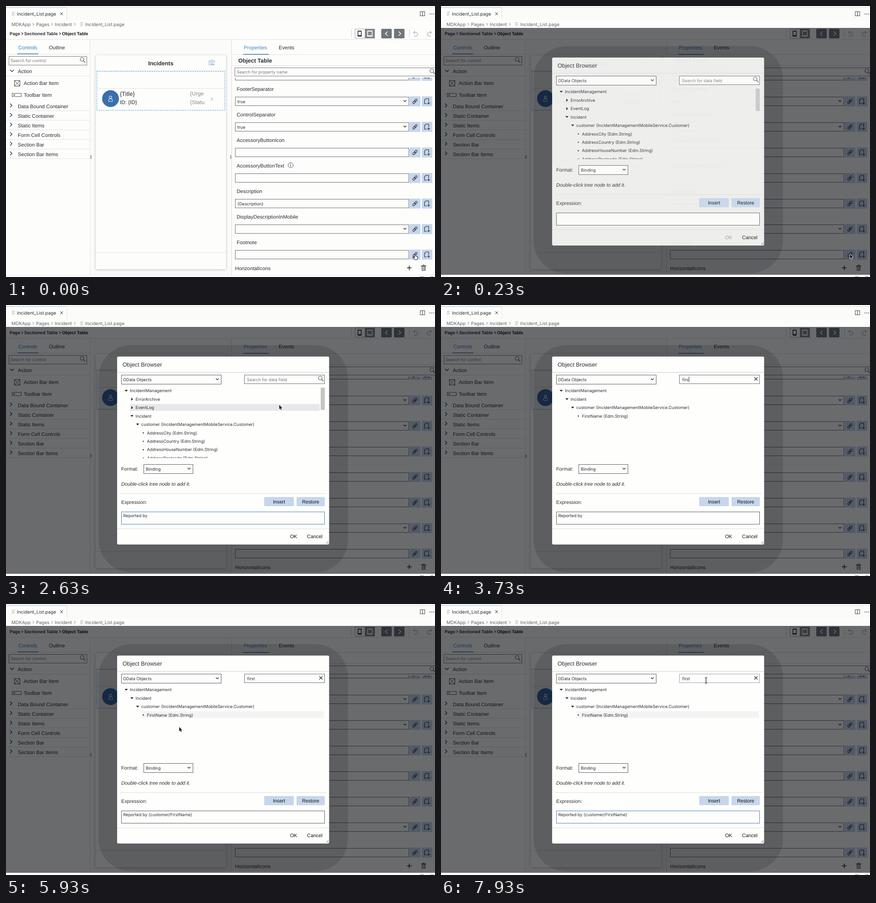
An HTML page with a canvas that plays this animation: 942x594 px, repeating every 8000 ms.

```html
<!DOCTYPE html>
<html lang="en">
<head>
<meta charset="utf-8">
<title>Object Browser</title>
<style>
html, body { margin: 0; width: 100%; height: 100%; overflow: hidden; background: #fdfdfc; }
canvas { display: block; }
</style>
</head>
<body>
<canvas id="stage" width="942" height="594"></canvas>
<script>
const ctx = document.getElementById('stage').getContext('2d');
const LOOP = 8000;
const SANS = '"Liberation Sans", Arial, sans-serif';
const UI = 'Inter, sans-serif';
const INK = '#2b2d30', PAPER = '#fdfdfc', BUTTON = '#c6d6ec', RULE = '#e2e2e2';

const clamp = (v, lo, hi) => Math.max(lo, Math.min(hi, v));

// y is the middle of the capitals
function text(str, x, y, size = 11.2, { color = INK, font = SANS, style = '', align = 'left' } = {}) {
  ctx.font = `${style} ${size}px ${font}`;
  ctx.textRendering = 'geometricPrecision';
  ctx.textAlign = align;
  ctx.fillStyle = color;
  ctx.fillText(str, x, y + size * 0.36);
  return ctx.measureText(str).width;
}
const small = (str, x, y, color = INK) => text(str, x, y, 9.2, { font: UI, color });

function fill(x, y, w, h, color) {
  ctx.fillStyle = color;
  ctx.fillRect(x, y, w, h);
}
function box(x, y, w, h, color = '#77797b', bg = PAPER) {
  if (bg) fill(x, y, w, h, bg);
  ctx.strokeStyle = color;
  ctx.lineWidth = 1;
  ctx.strokeRect(x + 0.5, y + 0.5, w - 1, h - 1);
}
function line(points, color = INK, width = 1) {
  ctx.beginPath();
  points.forEach(([x, y], i) => i ? ctx.lineTo(x, y) : ctx.moveTo(x, y));
  ctx.strokeStyle = color;
  ctx.lineWidth = width;
  ctx.stroke();
}
function circle(x, y, r, color, width = 0) {
  ctx.beginPath();
  ctx.arc(x, y, r, 0, Math.PI * 2);
  if (width) {
    ctx.strokeStyle = color;
    ctx.lineWidth = width;
    ctx.stroke();
  } else {
    ctx.fillStyle = color;
    ctx.fill();
  }
}
function polygon(points, color) {
  ctx.beginPath();
  points.forEach(([x, y]) => ctx.lineTo(x, y));
  ctx.closePath();
  ctx.fillStyle = color;
  ctx.fill();
}
function rounded(x, y, w, h, r, color) {
  ctx.beginPath();
  ctx.roundRect(x, y, w, h, r);
  ctx.fillStyle = color;
  ctx.fill();
}
const rule = (x1, y, x2, color = RULE) => fill(x1, y, x2 - x1, 1, color);
const right = (x, y, s, color, w = 1) => line([[x - s / 2, y - s], [x + s / 2, y], [x - s / 2, y + s]], color, w);
const down = (x, y, s, color = INK, w = 1.3) => line([[x - s, y - s / 2], [x, y + s / 2], [x + s, y - s / 2]], color, w);

function cross(x, y, s, color = INK, w = 1.2) {
  line([[x - s, y - s], [x + s, y + s]], color, w);
  line([[x + s, y - s], [x - s, y + s]], color, w);
}
function magnifier(x, y) {
  circle(x - 1, y - 1, 4, '#55585b', 1.2);
  line([[x + 2, y + 2], [x + 6, y + 6]], '#55585b', 1.4);
}
function linkIcon(x, y) {
  ctx.save();
  ctx.translate(x, y);
  ctx.rotate(-Math.PI / 4);
  ctx.strokeStyle = INK;
  ctx.lineWidth = 1.1;
  ctx.beginPath();
  ctx.roundRect(-6, -2, 7, 4, 2);
  ctx.roundRect(-1, -2, 7, 4, 2);
  ctx.stroke();
  ctx.restore();
}
function newPageIcon(x, y) {
  line([[x + 4, y], [x + 4, y - 6], [x - 2, y - 6], [x - 5, y - 3], [x - 5, y + 5], [x, y + 5]], INK, 1.2);
  line([[x + 1, y + 4], [x + 7, y + 4]], INK, 1.2);
  line([[x + 4, y + 1], [x + 4, y + 7]], INK, 1.2);
}
function fileIcon(x, y) {
  [7, 5, 7, 4].forEach((w, i) => fill(x, y - 4 + i * 2.4, w, 0.9, '#a9adb0'));
}
function undoIcon(x, y, dir) {
  line([[x - 2 * dir, y - 6], [x - 5 * dir, y - 3], [x - 2 * dir, y]], '#a5a8ab', 1.2);
  ctx.beginPath();
  ctx.moveTo(x - 5 * dir, y - 3);
  ctx.bezierCurveTo(x + 7 * dir, y - 5, x + 7 * dir, y + 6, x - 4 * dir, y + 5);
  ctx.stroke();
}

function drawTop() {
  fill(0, 0, 942, 594, PAPER);
  fill(0, 0, 942, 3, '#f8f8f5');
  rule(0, 3, 942, '#e4e6e2');
  fill(133, 4, 809, 27, '#fbfbfa');
  rule(0, 3, 133, '#9fc6e6');
  fill(133, 4, 1, 27, RULE);
  fileIcon(13, 17);
  const tab = { font: UI };
  text('Incident_List.page', 24, 17.5, 10, tab);
  cross(122, 17, 3, INK, 1);
  box(909, 12, 11, 10, '#45484b');
  fill(914, 12, 1, 10, '#45484b');
  [931, 935, 939].forEach(x => circle(x, 17.5, 0.9, INK));
  const crumb = { font: UI, color: '#606366' };
  text('MDKApp', 12, 40, 10, crumb);
  text('Pages', 66, 40, 10, crumb);
  text('Incident', 107, 40, 10, crumb);
  text('Incident_List.page', 174, 40, 10, crumb);
  [60, 101, 151].forEach(x => right(x, 40, 3, '#707376'));
  fileIcon(163, 40);
}

function drawToolbar() {
  const bold = { style: 'bold' };
  text('Page', 8, 60.5, 9.7, bold);
  text('Sectioned Table', 40, 60.5, 9.7, bold);
  text('Object Table', 123, 60.5, 9.7, { style: 'bold', color: '#111' });
  [35.5, 118.5].forEach(x => right(x, 60.5, 2.6, INK, 1.2));
  fill(758, 51, 1, 19, '#d0d2d4');
  fill(885, 51, 1, 19, '#d0d2d4');
  box(766, 50, 44, 21, '#a5a8ab');
  fill(788, 50, 22, 21, '#85898d');
  rounded(772, 54, 9, 13, 1.5, INK);
  fill(773.5, 56, 6, 8, PAPER);
  rounded(793, 54, 12, 13, 1.5, PAPER);
  fill(794.5, 56, 9, 8.5, '#85898d');
  [824, 852].forEach(x => rounded(x, 50, 23, 21, 2, '#70757a'));
  line([[838, 56], [833, 60.5], [838, 65]], '#fff', 1.5);
  line([[862, 56], [867, 60.5], [862, 65]], '#fff', 1.5);
  undoIcon(900, 61, 1);
  undoIcon(929, 61, -1);
  rule(0, 73, 942);
}

function drawControls() {
  text('Controls', 27, 91, 11.2, { color: '#2f7cc4' });
  text('Outline', 94, 91);
  rule(0, 105, 184);
  fill(25, 104, 46, 2, '#7290ac');
  box(6, 110, 172, 20);
  small('Search for control', 10, 120, '#777a7d');
  magnifier(168, 118);
  down(13, 142, 4, '#1e4468', 1.5);
  text('Action', 26, 143);
  rule(0, 153, 184);
  box(18, 163, 13, 13, '#3d4043');
  cross(24.5, 169.5, 5.5, '#3d4043', 1);
  text('Action Bar Item', 39, 168.5);
  box(13, 191, 21, 8, '#55585b');
  fill(16, 194, 4, 2, '#55585b');
  text('Toolbar Item', 39, 195);
  ['Data Bound Container', 'Static Container', 'Static Items', 'Form Cell Controls', 'Section Bar', 'Section Bar Items']
    .forEach((name, i) => {
      const y = 219 + i * 21;
      right(11, y - 1, 4, '#1e4468', 1.5);
      text(name, 26, y + 0.5);
      rule(0, y + 10, 184);
    });
  fill(184, 73, 1, 516, RULE);
}

function drawPreview() {
  fill(185, 74, 310, 515, '#fbfbfa');
  ctx.save();
  ctx.shadowColor = 'rgba(0,0,0,.25)';
  ctx.shadowBlur = 5;
  ctx.shadowOffsetY = 1;
  fill(197, 108, 286, 469, PAPER);
  ctx.restore();
  text('Incidents', 340, 125, 12.7, { style: 'bold', align: 'center' });
  const sky = '#7ba6d2';
  line([[456, 129], [446, 129], [446, 121], [449, 121], [450, 119], [454, 119], [455, 121], [458, 121], [458, 124]], sky, 1.1);
  circle(452, 125, 2.4, sky, 1);
  line([[454, 128], [459, 128]], sky, 1.1);
  rule(197, 141, 483);
  rule(200, 180, 480);
  rule(197, 540, 483);
  ctx.setLineDash([3, 2]);
  box(199, 143, 282, 86, '#3f9fd6', null);
  ctx.setLineDash([]);
  circle(229.5, 203, 18.5, '#3b6fab');
  circle(229.5, 200, 2.6, '#e8eef6', 1.1);
  ctx.beginPath();
  ctx.roundRect(225.5, 203.5, 8, 6, [3, 3, 1, 1]);
  ctx.stroke();
  text('{Title}', 250, 192, 13);
  text('ID: {ID}', 250, 210.5, 11.7);
  ctx.save();
  ctx.beginPath();
  ctx.rect(400, 182, 35, 40);
  ctx.clip();
  text('{Urgency}', 404, 192, 12, { color: '#888b8e' });
  text('{Status}', 404, 210.5, 12, { color: '#888b8e' });
  ctx.restore();
  right(452, 204, 3.5, '#777');
  [185, 492].forEach(x => fill(x, 327, 3, 8, '#b2b4b6'));
}

function propertyRow(y, value, isSelect) {
  box(503, y - 10, 382, 20, '#6d6f72');
  if (value) small(value, 508, y + 0.5);
  if (isSelect) down(876, y - 1, 3);
  fill(886, y - 11, 24, 22, BUTTON);
  fill(913, y - 11, 23, 22, BUTTON);
  linkIcon(898, y);
  newPageIcon(924, y);
}

function drawProperties() {
  fill(495, 74, 1, 515, '#d8d9da');
  text('Properties', 522, 91, 11.2, { color: '#3a87d2' });
  text('Events', 599, 91);
  rule(496, 106, 942);
  fill(521, 105, 56, 2, '#7290ac');
  text('Object Table', 510, 119.5, 12.5, { style: 'bold' });
  rule(496, 130, 942);
  ctx.save();
  ctx.beginPath();
  ctx.rect(496, 157, 446, 432);
  ctx.clip();
  propertyRow(153, '', true);
  [['FooterSeparator', 'true', 1], ['ControlSeparator', 'true', 1], ['AccessoryButtonIcon'], ['AccessoryButtonText'],
    ['Description', '{Description}'], ['DisplayDescriptionInMobile', '', 1], ['Footnote']]
    .forEach(([label, value, isSelect], i) => {
      const y = Math.round(181.3 + i * 55.9);
      text(label, 506.5, y + 0.5);
      propertyRow(y + 28, value, isSelect);
    });
  circle(625, 349, 5.5, '#55585b', 1);
  fill(624.5, 347.5, 1, 4.5, INK);
  fill(624.5, 345.5, 1, 1, INK);
  ctx.restore();
  box(502, 135, 446, 19);
  small('Search for property name', 506.5, 144.5, '#777a7d');
  magnifier(936, 143);
  text('HorizontalIcons', 503, 575, 11.3);
  fill(880.5, 573, 10, 1.6, INK);
  fill(884.7, 569, 1.6, 10, INK);
  box(913, 570, 8, 10, INK);
  rule(911, 569, 923, INK);
  rule(915, 567, 919, INK);
  fill(915.5, 572, 1, 6, INK);
  fill(918, 572, 1, 6, INK);
}

function drawBottom() {
  rule(0, 589, 942, '#e6e6e0');
  fill(0, 590, 942, 4, PAPER);
  fill(909, 593, 8, 1, '#777');
  fill(932, 593, 6, 1, '#777');
}

// [indent level, label, marker]
const ALL = [
  [0, 'IncidentManagement', 'open'], [1, 'ErrorArchive', 'shut'], [1, 'EventLog', 'shut'], [1, 'Incident', 'open'],
  [2, 'customer (IncidentManagementMobileService.Customer)', 'open'], [3, 'AddressCity (Edm.String)'],
  [3, 'AddressCountry (Edm.String)'], [3, 'AddressHouseNumber (Edm.String)'], [3, 'AddressPostcode (Edm.String)']
];
const FOUND = [ALL[0], ALL[3], ALL[4], [3, 'FirstName (Edm.String)']];

function drawTree(rows, mouse, selected) {
  const rightEdge = rows === ALL ? 689 : 698;
  ctx.save();
  ctx.beginPath();
  ctx.rect(246, 178, 460, 157.5);
  ctx.clip();
  rows.forEach(([level, label, marker], i) => {
    const y = 187.5 + i * 18.45, x = 272 + level * 12.5;
    const hovered = mouse && mouse.x > 250 && mouse.x < rightEdge && Math.abs(mouse.y - y) < 8.5 && mouse.y < 335;
    if (hovered || i === selected) {
      fill(x - 12, Math.round(y - 7.5), rightEdge - x + 12, 15, hovered ? '#e8e8ea' : '#f4f4f4');
    }
    const m = x - 8;
    if (marker === 'open') polygon([[m - 3.5, y - 1.5], [m + 3.5, y - 1.5], [m, y + 2.5]], INK);
    else if (marker === 'shut') polygon([[m - 1.5, y - 3], [m + 2.5, y + 0.5], [m - 1.5, y + 4]], INK);
    else circle(m, y + 0.5, 1.3, INK);
    small(label, x, y + 0.5);
  });
  ctx.restore();
  if (rows === ALL) rounded(691, 181, 9, 49, 1, '#c6c6c6');
}

function caret(x, y) {
  fill(Math.round(x), y - 6, 1, 12, INK);
}

function drawDialog(s, mouse) {
  ctx.globalAlpha = s.fade;
  rounded(244, 113, 465.5, 412, 3, '#fefefd');
  text('Object Browser', 256, 130.5, 12.7);
  rule(244, 147, 709, '#d9dadb');
  rule(244, 148, 709, '#f0f0f0');
  box(253, 153, 220, 21, '#5d5f62');
  small('OData Objects', 257, 164);
  down(464, 162.5, 3);
  box(523, 153, 177, 20, s.searchBorder);
  if (s.search) {
    const w = small(s.search, 529.5, 163.5);
    if (s.searchCaret) caret(530 + w, 163);
    cross(691.5, 162, 3.5);
  } else {
    small('Search for data field', 529, 163.5, '#777a7d');
    magnifier(691, 161);
    if (s.searchCaret) caret(529, 163);
  }
  drawTree(s.rows, mouse, s.selected);

  text('Format:', 253, 359.5, 10.8);
  box(302, 349, 109, 21, '#5d5f62');
  small('Binding', 307, 359.5);
  down(402, 358.5, 3);
  text('Double-click tree node to add it.', 253, 392.5, 10.8, { style: 'italic' });
  rule(250, 413, 704, '#dcdddd');
  text('Expression:', 253, 432, 10.8);
  rounded(567, 421, 65, 20, 1, BUTTON);
  rounded(638, 421, 62, 20, 1, BUTTON);
  text('Insert', 599.5, 431.5, 10.7, { align: 'center', color: '#111' });
  text('Restore', 669, 431.5, 10.7, { align: 'center', color: '#111' });
  box(253, 453, 447, 28, s.expressionFocus ? '#4a84b8' : '#5d5f62');
  const w = small(s.expression, 257.5, 461.5);
  if (s.expressionCaret) caret(257.5 + w, 461);
  rule(244, 490, 709, '#dcdddd');
  text('OK', 631.5, 507.5, 10.9, { align: 'center', color: s.expression ? '#111' : '#949698' });
  text('Cancel', 678, 507.5, 10.9, { align: 'center', color: '#111' });
  line([[703, 523], [708, 518]], '#666');
  line([[706, 523], [708, 521]], '#666');
  ctx.globalAlpha = 1;
}

// [time, x, y]; null hides the pointer until the next entry
const PATH = [
  [0, 898, 544], [400, null], [2260, 407, 441], [2430, 407, 441], [2630, 600, 219], [3130, 590, 163], [3260, null],
  [4900, 560, 166], [5030, 511, 201], [5630, 365, 242], [5760, 365, 242], [6530, 487, 461], [6930, 487, 461],
  [7130, 500, 441], [7359, 500, 441], [7360, 363, 423], [7700, 363, 423], [7900, 582, 167], [LOOP, 582, 167]
];

function pointerAt(t) {
  const i = PATH.findLastIndex(p => p[0] <= t);
  const [t0, x0, y0] = PATH[i];
  if (x0 === null) return null;
  const [t1, x1, y1] = PATH[i + 1] || PATH[i];
  if (x1 === null) return { x: x0, y: y0 };
  const k = clamp((t - t0) / (t1 - t0), 0, 1), e = k * k * (3 - 2 * k);
  return { x: x0 + (x1 - x0) * e, y: y0 + (y1 - y0) * e };
}

function drawPointer({ x, y }, t) {
  const inSearch = x > 524 && x < 686 && y > 153 && y < 174;
  const inExpression = x > 253 && x < 700 && y > 453 && y < 481;
  ctx.save();
  ctx.translate(x, y);
  ctx.lineJoin = 'round';
  if (t < 100) {
    const hand = [[-1, 0], [1, 0], [1.5, 4], [6, 5.5], [6, 9], [4.5, 12], [-1, 12], [-4.5, 7], [-3.5, 6], [-1, 8]];
    polygon(hand, '#fff');
    line([...hand, hand[0]], '#222', 1.1);
  } else if (inSearch || inExpression) {
    line([[0, -5], [0, 6]], '#111', 1.2);
    line([[-2.5, -6], [0, -5], [2.5, -6]], '#111');
    line([[-2.5, 7], [0, 6], [2.5, 7]], '#111');
  } else {
    const arrow = [[0, 0], [0, 9.5], [2.2, 7.5], [3.8, 11], [5.3, 10.3], [3.8, 7], [6.6, 6.8]];
    line([...arrow, arrow[0]], '#fff', 1.6);
    polygon(arrow, '#111');
  }
  ctx.restore();
}

function stateAt(t) {
  const typed = clamp(Math.floor((t - 330) / 39), 0, 11);
  const searched = t < 3260 ? 0 : clamp(Math.floor((t - 3260) / 140) + 1, 0, 5);
  const inserted = t >= 5730;
  return {
    fade: t < 230 ? clamp((t - 60) / 170, 0, 1) * 0.9 : t < 330 ? 0.9 : 1,
    expression: 'Reported by'.slice(0, typed) + (t >= 1130 ? ' ' : '') + (inserted ? '{customer/FirstName}' : ''),
    expressionFocus: (t >= 330 && t < 3130) || t >= 6530,
    expressionCaret: (t >= 330 && t < 1830) || (t >= 6730 && t < 7730),
    search: 'first'.slice(0, searched),
    searchCaret: t >= 3130 && t < 5630,
    searchBorder: t >= 7830 ? '#a0a2a4' : '#6d6f72',
    rows: searched >= 3 ? FOUND : ALL,
    selected: t >= 5630 ? 3 : -1
  };
}

function render(t) {
  const state = stateAt(t), mouse = pointerAt(t);
  drawTop();
  drawToolbar();
  drawControls();
  drawPreview();
  drawProperties();
  const dim = clamp((t - 30) / 150, 0, 1);
  if (dim) {
    fill(0, 48, 942, 541, `rgba(0,3,8,${0.58 * dim})`);
    rounded(203, 88, 548, 498, 72, `rgba(0,0,0,${0.12 * dim})`);
  }
  drawBottom();
  if (state.fade) drawDialog(state, mouse);
  if (mouse) drawPointer(mouse, t);
}

function tick() {
  render(performance.now() % LOOP);
  requestAnimationFrame(tick);
}
tick();
</script>
</body>
</html>
```
